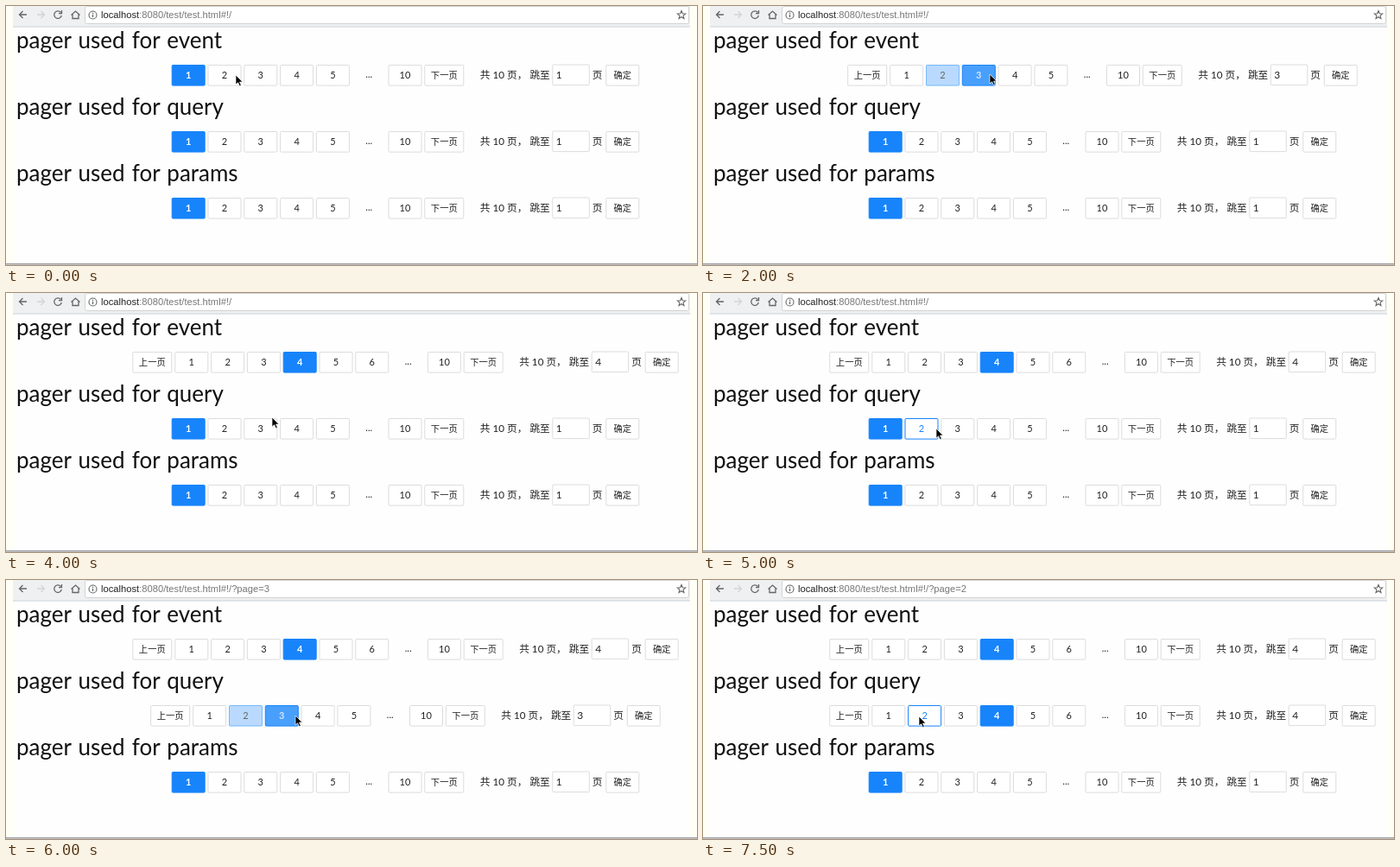
Recreate the animation shown at these times as an HTML page. Size 800x300 px, loop 8000 ms.

```html
<!DOCTYPE html>
<html lang="zh-CN">
<head>
<meta charset="utf-8">
<style>
html, body { margin: 0; width: 100%; height: 100%; overflow: hidden; background: #fffff5; }
svg { display: block; }
text { font-family: Lato, "Noto Sans CJK SC", "Noto Sans CJK", sans-serif; fill: #222; white-space: pre; }
.title { font-size: 26px; word-spacing: 1.5px; fill: #111; }
.url { font-family: "Liberation Sans", Arial, sans-serif; font-size: 11.2px; fill: #777; }
.mid { text-anchor: middle; }
.icon { fill: none; stroke: #666; stroke-width: 1.3; }
</style>
</head>
<body>
<svg width="800" height="300" viewBox="0 0 800 300">
  <rect x="8" width="784" height="300" fill="#fefefe"/>
  <rect x="8" width="784" height="23.5" fill="#eff0f1"/>
  <path d="M8 24H792" stroke="#c5ced8"/>
  <rect x="91.5" y=".5" width="699" height="20" rx="2" fill="#fff" stroke="#d2d2d2"/>
  <g class="icon">
    <path d="M24 10H15.5M19.5 6L15.5 10L19.5 14"/>
    <path d="M36 10H44.5M40.5 6L44.5 10L40.5 14" stroke="#d4d4d4"/>
    <path d="M63.5 7.5A4.3 4.3 0 1 0 64.3 11M64.5 5V8.6H61"/>
    <path d="M75.5 10.5L80.5 6L85.5 10.5M77 9.5V14.5H84V9.5"/>
    <circle cx="100.5" cy="10.5" r="4.5" stroke-width="1.1"/>
    <path d="M100.5 9.7V13M100.5 7.8V8.9"/>
    <path id="star" stroke-width="1.1"/>
  </g>
  <text class="url" x="110" y="14"><tspan fill="#222">localhost</tspan>:8080/test/test.html#!/<tspan id="query"></tspan></text>
  <text class="title" x="12" y="49">pager used for event</text>
  <text class="title" x="12" y="126">pager used for query</text>
  <text class="title" x="12" y="203">pager used for params</text>
  <g id="pagers"></g>
  <path d="M0 298.8H800" stroke="#85858c" stroke-width="1.2"/>
  <path id="arrow" d="M0 0V11L2.6 8.7L4.5 12.8L6.3 12L4.5 8H8Z" fill="#000" stroke="#fff" stroke-width=".7"/>
  <path id="beam" d="M-2.5 -5.5Q0 -5.5 0 -4Q0 -5.5 2.5 -5.5M0 -4.5V4.5M-2.5 5.5Q0 5.5 0 4Q0 5.5 2.5 5.5M-1.2 1H1.2" fill="none" stroke="#222" stroke-width="1.1"/>
</svg>
<script>
const $ = id => document.getElementById(id);
const BLUE = '#1784fb', STEP = 41.8, WORD = 49, CENTER = 462.5;

// x, y, event page, query page, active row, extras
const steps = [
  [266, 80, 1, 1, 0, {}],
  [264, 80, 1, 1, 0, { hover: 2 }],
  [263, 80, 2, 1, 0, { from: 1, fade: .4 }],
  [312, 80, 2, 1, 0, { hover: 3 }],
  [332, 79, 3, 1, 0, { from: 2, fade: .3 }],
  [360, 78, 4, 1, 0, { from: 3, fade: .2 }],
  [352, 90, 4, 1, 0, {}],
  [330, 131, 4, 1, 0, {}],
  [308, 144, 4, 1, 1, {}],
  [285, 158, 4, 1, 1, { hover: 3 }],
  [270, 157, 4, 1, 1, { hover: 2 }],
  [275, 157, 4, 2, 1, { beam: true, url: 2 }],
  [335, 157, 4, 3, 1, { from: 2, fade: .3, url: 3 }],
  [362, 155, 4, 4, 1, { from: 3, fade: .3, url: 4 }],
  [330, 160, 4, 4, 1, { url: 4 }],
  [250, 158, 4, 4, 1, { hover: 2, url: 2 }]
];

const label = (x, y, s, size, attrs = '') =>
  `<text x="${x}" y="${y}" font-size="${size}" ${attrs}>${s}</text>`;

const box = (x, y, w, attrs = '') =>
  `<rect x="${x + .5}" y="${y}" width="${w - 1}" height="23.6" rx="1" fill="#fff" stroke="#dcdcdc" ${attrs}/>`;

const wordButton = (x, y, w, s) =>
  box(x, y + .5, w) + label(x + w / 2, y + 16, s, 10.3, 'class="mid"');

function numberButton(x, y, n, page, { hover, from, fade }) {
  let rect = '', style = '';
  if (n === page) {
    rect = `style="fill:${BLUE};stroke:${BLUE};fill-opacity:${from ? .78 : 1}"`;
    style = `fill:#fff;font-weight:700;opacity:${from ? .75 : 1}`;
  } else if (n === from) {
    rect = `style="fill:${BLUE};stroke:${BLUE};fill-opacity:${fade};stroke-opacity:.5"`;
    style = 'fill:#666';
  } else if (n === hover) {
    rect = `style="stroke:${BLUE}"`;
    style = `fill:${BLUE}`;
  }
  return box(x, y + .5, 39, rect) + label(x + 19.5, y + 15.5, n, 11, `class="mid" style="${style}"`);
}

function pager(y, page, state) {
  const count = Math.max(5, page + 2), prev = page > 1 ? WORD : 0;
  let x = CENTER - (prev + (count + 2) * STEP + 249) / 2, out = '';
  if (prev) out += wordButton(x, y, 46, '上一页');
  x += prev;
  for (let n = 1; n <= count; n++, x += STEP) out += numberButton(x, y, n, page, state);
  out += label(x + 19.5, y + 15, '...', 11, 'class="mid"');
  x += STEP;
  out += numberButton(x, y, 10, page, state);
  x += STEP;
  return out + wordButton(x, y, 46, '下一页') +
    label(x + 64.5, y + 16, '共 10 页，&#160;跳至', 11.7) +
    box(x + 148, y, 43.5) + label(x + 152.5, y + 16, page, 12) +
    label(x + 194.5, y + 16, '页', 11.7) + wordButton(x + 210, y, 39, '确定');
}

function show([x, y, event, query, row, state]) {
  $('pagers').innerHTML = [event, query, 1]
    .map((page, i) => pager(68 + 77 * i, page, i === row ? state : {})).join('');
  $('query').textContent = state.url ? '?page=' + state.url : '';
  for (const id of ['arrow', 'beam']) {
    $(id).setAttribute('transform', `translate(${x} ${y})`);
    $(id).style.display = (id === 'beam') === !!state.beam ? '' : 'none';
  }
}

$('star').setAttribute('d', 'M' + Array.from({ length: 10 }, (_, i) => {
  const a = i * Math.PI / 5, r = i % 2 ? 2.2 : 5;
  return [782 + r * Math.sin(a), 10.5 - r * Math.cos(a)];
}).join('L') + 'Z');

let shown = -1;
const start = performance.now();
function tick() {
  const i = Math.floor((performance.now() - start) % 8000 / 500);
  if (i !== shown) show(steps[shown = i]);
  requestAnimationFrame(tick);
}
tick();
</script>
</body>
</html>
```
